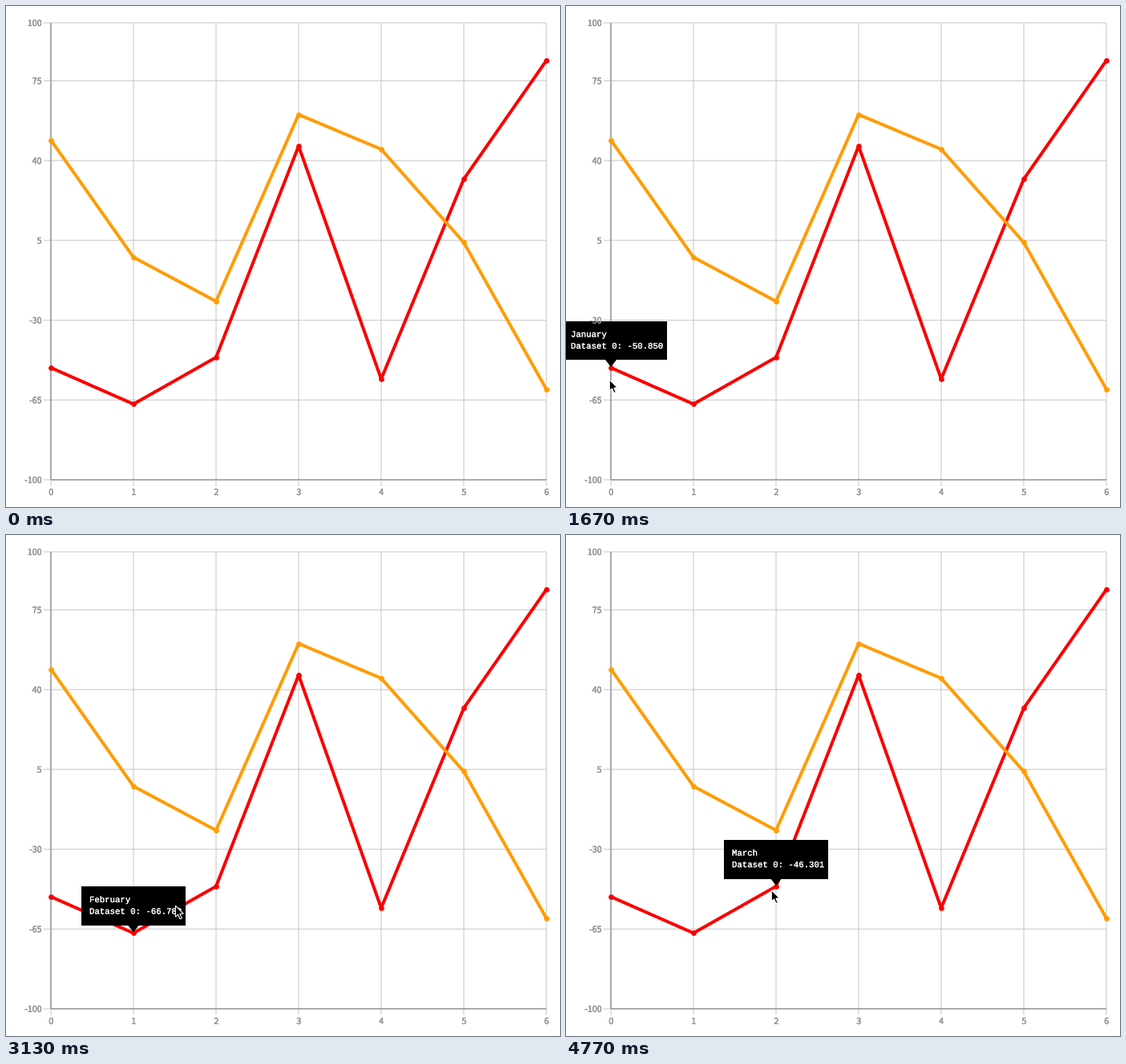
Write a matplotlib script that moves like this. It is 691 by 626 pixels and loops after 4810 ms.

```python
import numpy as np
import matplotlib.pyplot as plt
from matplotlib.animation import FuncAnimation
from matplotlib.patches import Polygon, Rectangle
from matplotlib.patheffects import withStroke

W, H, DPI = 691, 626, 100
STEP, FRAMES = 37, 130  # 4810 ms per loop

LEFT, BOTTOM, TOP, GAP_X = 56, 592, 21, 103
UNIT = 99.7 / 35  # pixels per value
GRID, AXIS, LABEL = "#cfcfcf", "#8e8e8e", "#949494"

RED = [-50.850, -66.788, -46.301, 46.4, -55.8, 31.9, 83.9]
ORANGE = [49, -2.4, -21.7, 60.2, 45, 4.1, -60.3]
MONTHS = ["January", "February", "March"]
HOVER_TIMES = [1600, 2360, 3160]

# Cursor moves: start ms, end ms, destination x, y
ENTRY = (36, 603)
MOVES = [
    (850, 1100, 31, 568),
    (1430, 1720, 55, 462),
    (2200, 2510, 155, 487),
    (2870, 3348, 256, 443.5),
]
ARROW = np.array([(0, 0), (0, 14), (3.2, 11.1), (5.6, 16.6),
                  (8, 15.6), (5.6, 10.3), (9.9, 9.9)]) + 0.3


def pt(px):
    return px * 72 / DPI


def to_x(i):
    return LEFT + GAP_X * i


def to_y(value):
    return BOTTOM - (value + 100) * UNIT


def ease(t, start, end):
    s = np.clip((t - start) / (end - start), 0, 1)
    return s * s * (3 - 2 * s)


fig = plt.figure(figsize=(W / DPI, H / DPI), dpi=DPI, facecolor="white")
ax = fig.add_axes([0, 0, 1, 1])
ax.set_xlim(0, W)
ax.set_ylim(H, 0)
ax.axis("off")


def stroke(x, y, color, width, z=1):
    ax.plot(x, y, color=color, lw=pt(width), zorder=z, snap=False,
            solid_capstyle="butt", solid_joinstyle="round")


def write(x, y, text, color, size, weight, **style):
    """Text thickened by a hairline of its own colour."""
    return ax.text(x, y, text, color=color, fontsize=pt(size), zorder=6,
                   path_effects=[withStroke(linewidth=pt(weight),
                                            foreground=color)], **style)


def label(x, y, text, align):
    write(x, y, text, LABEL, 10.6, 0.45, ha=align, va="center_baseline",
          family="Noto Sans CJK JP")


def draw_grid():
    right = to_x(6)
    for i in range(7):
        stroke([to_x(i)] * 2, [TOP, 600], GRID, 1.2)
        label(to_x(i) + 0.3, 607, str(i), "center")
    for value in (*range(-100, 76, 35), 100):
        y = TOP if value == 100 else to_y(value)
        stroke([47, right], [y, y], GRID, 1.2)
        label(44.5, y, str(value), "right")
    stroke([LEFT, LEFT], [TOP, BOTTOM], AXIS, 1.3, 2)
    stroke([LEFT, right], [BOTTOM, BOTTOM], AXIS, 1.3, 2)


def draw_series(values, color, z):
    x, y = to_x(np.arange(7)), to_y(np.array(values))
    stroke(x, y, color, 4, z)
    ax.plot(x, y, "o", color=color, ms=pt(6.8), mew=0, zorder=z, snap=False)


draw_grid()
draw_series(RED, "#f90000", 3)
draw_series(ORANGE, "#ff9c00", 4)

box = Rectangle((0, 0), 130, 48.5, fc="black", lw=0, zorder=5)
beak = Polygon(np.zeros((3, 2)), fc="black", lw=0, zorder=5)
cursor = Polygon(ARROW, fc="black", ec="white", lw=pt(1.1), zorder=8)
for part in (box, beak, cursor):
    ax.add_patch(part)
lines = [write(0, 0, "", "white", 10.67, 0.2, family="Liberation Mono")
         for _ in range(2)]


def show_tip(i):
    for part in (box, beak, *lines):
        part.set_visible(i >= 0)
    if i < 0:
        return
    x, y = to_x(i), to_y(RED[i])
    left, top = max(x - 65, -4), y - 58
    box.set_xy((left, top))
    beak.set_xy([(x - 7, y - 10), (x + 7, y - 10), (x, y - 1)])
    for k, text in enumerate((MONTHS[i], f"Dataset 0: {RED[i]:.3f}")):
        lines[k].set_text(text)
        lines[k].set_position((left + 10, top + 19.5 + 14.6 * k))


def cursor_tip(t):
    pos = np.array(ENTRY, float)
    for start, end, x, y in MOVES:
        pos += ease(t, start, end) * (np.array([x, y]) - pos)
    return pos


def draw(frame):
    t = (frame + 0.5) * STEP
    show_tip(sum(t >= start for start in HOVER_TIMES) - 1)
    cursor.set_visible(t >= MOVES[0][0])
    cursor.set_xy(ARROW + cursor_tip(t))
    return box, beak, cursor, *lines


anim = FuncAnimation(fig, draw, frames=FRAMES, interval=STEP,
                     init_func=lambda: draw(0), repeat=True, repeat_delay=0)
plt.show()
```
